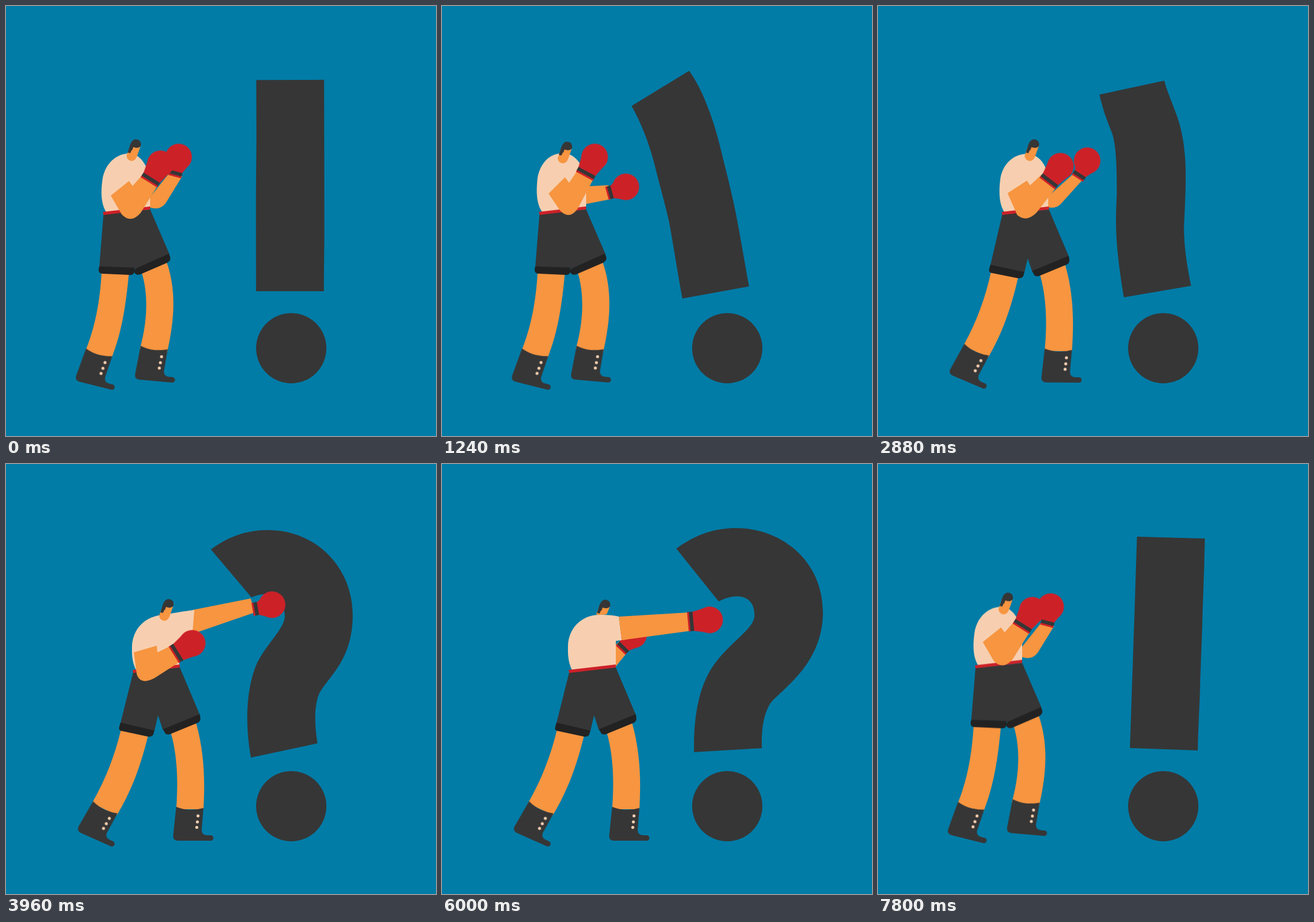
An HTML page without scripts that plays this animation: 710 by 710 pixels, repeating every 7840 ms.

```html
<!DOCTYPE html>
<html lang="en">
<head>
<meta charset="utf-8">
<title>Boxer and punctuation</title>
<style>
html, body { margin: 0; width: 100%; height: 100%; overflow: hidden; background: #007ca7; }
svg { display: block; width: 100%; height: 100%; }

.ink { fill: #363636; }
.skin { fill: #f79540; }
.cream { fill: #f7cfb0; }
.red { fill: #cd2128; }
.hem { fill: #222; }

.stance, .fight, .hop, #mark { animation: 7840ms linear infinite; }
.stance { animation-name: stance; }
.fight { animation-name: fight; }
.hop { animation-name: hop; }
#mark { animation-name: mark; animation-timing-function: ease-in-out; }

/* feet and hips: a = at rest, f = stepped in, n = feet together */
@keyframes stance {
  0%, 1.28%, 11.48%, 33.42%, 65.05%, 72.45%, 88.01%, 100% { d: var(--a); transform: var(--ta, none); }
  4.08%, 8.16%, 37.11%, 55.61%, 75.51%, 80.87% { d: var(--f); transform: var(--tf, none); }
  59.95%, 62.76%, 84.69% { d: var(--n, var(--a)); transform: var(--tn, var(--ta, none)); }
}

/* upper body: a = rest, s = sway, n = tucked, g = guard, p = far punch, q = near punch */
@keyframes fight {
  0%, 1.53%, 11.48%, 13.78%, 17.86%, 22.96%, 30.61%, 33.42%, 65.05%, 72.45%, 88.01%, 100% { d: var(--a); transform: var(--ta, none); }
  15.82%, 26.79% { d: var(--s, var(--a)); transform: var(--ts, var(--ta, none)); }
  59.95%, 62.76%, 84.69% { d: var(--n, var(--a)); transform: var(--tn, var(--ta, none)); }
  3.57%, 7.91%, 8.93%, 36.73%, 41.33%, 49.23%, 54.08%, 55.61%, 75%, 79.59%, 80.87% { d: var(--g, var(--a)); transform: var(--tg, none); }
  37.76%, 39.29%, 50.26%, 52.04% { d: var(--p, var(--a)); transform: var(--tp, none); }
  4.59%, 6.12%, 76.02%, 77.55% { d: var(--q, var(--a)); transform: var(--tq, none); }
}

@keyframes hop {
  0%, 11.73%, 15.82%, 19.9%, 23.98%, 28.06%, 32.14%, 62.76%, 66.84%, 70.92%, 87.76%, 91.84%, 95.92%, 100% {
    transform: translateY(0); animation-timing-function: ease-out;
  }
  14.29%, 18.37%, 22.45%, 26.53%, 30.61%, 65.31%, 69.39%, 90.31%, 94.39%, 98.47% {
    transform: translateY(var(--h)); animation-timing-function: ease-in;
  }
}

@keyframes mark {
  0%, 10.2%, 33.16%, 43.37%, 56.12%, 81.63%, 100% { d: var(--up); animation-timing-function: ease-out; }
  2.04%, 29.85%, 46.43%, 60.2%, 62.76%, 73.47%, 86.73%, 88.01% { d: var(--left); }
  14.8%, 15.82%, 48.21% { d: var(--far-left); }
  3.57%, 36.73%, 49.49%, 75% { d: var(--wave); animation-timing-function: linear; }
  4.59%, 37.76%, 50.51%, 76.02% { d: var(--hit); animation-timing-function: linear; }
  5.1%, 38.27%, 51.02%, 76.53% { d: var(--hook); animation-timing-function: ease-out; }
  6.12%, 7.91%, 39.29%, 41.33%, 52.04%, 53.83%, 77.55%, 79.34% { d: var(--recoil); animation-timing-function: ease-in; }
  22.96% { d: var(--far-right); }
  68.88%, 96.43% { d: var(--right); animation-timing-function: ease-in; }
  99.49% { d: var(--tilt); animation-timing-function: linear; }
}

#mark {
  --up: path("M414 122C414 151 414 181 414 210C414 250 413 290 413 330C413 377 413 424 413 471L525 471C525 430 526 400 526 365C526 330 526 290 526 250C526 220 526 190 526 165C526 150 526 136 526 122Z");
  --tilt: path("M428 120C427 149 426 178 425 208C424 248 422 288 421 328C419 375 418 422 416 469L528 473C529 432 531 402 532 367C533 332 535 292 536 252C537 222 538 192 539 167C539 152 540 138 540 123Z");
  --right: path("M457 118C454 147 451 176 449 206C445 246 441 286 437 326C432 372 428 419 423 466L535 477C539 436 542 406 545 371C549 336 553 297 556 257C559 227 562 197 564 171C565 157 567 142 568 128Z");
  --far-right: path("M478 120C472 150 467 180 463 208C457 246 450 290 444 328C438 372 432 419 426 465L538 480C543 440 549 405 554 371C560 336 566 297 572 258C577 228 583 197 587 172C589 160 592 148 594 137Z");
  --left: path("M341 150C352 176 360 203 366 233C372 268 379 305 384 338C390 385 396 430 402 479L513 465C507 420 502 380 496 335C491 305 486 280 482 252C476 215 470 190 463 165C457 143 451 123 445 107Z");
  --far-left: path("M313 165C330 195 343 230 351 262C360 298 369 330 374 352C381 387 388 435 397 483L507 463C499 420 492 375 482 327C476 300 470 275 464 252C456 218 449 192 438 165C430 143 419 122 408 107Z");
  --wave: path("M365 145C371 175 380 196 384 206C391 222 394 255 394 310C392 360 391 390 406 481L517 462C509 425 505 390 505 365C506 340 507 310 507 280C507 235 501 200 491 173C485 155 479 140 475 123Z");
  --hit: path("M404 220C440 205 459 225 459 252C457 275 425 300 411 335C396 375 394 430 404 485L514 461C509 432 508 400 516 380C530 352 571 325 571 250C571 170 510 109 431 109C395 109 364 121 337 141Z");
  --hook: path("M456 227C485 212 515 216 515 250C515 275 466 298 440 345C420 382 415 430 416 476L528 469C527 440 530 416 540 398C553 376 628 335 628 245C628 160 560 106 484 106C445 106 413 120 386 140Z");
  --recoil: path("M495 225C525 205 556 208 558 245C557 270 498 298 465 345C440 382 431 430 424 467L536 477C536 448 545 420 560 398C585 366 671 335 671 240C671 155 605 95 528 95C490 95 455 107 425 128Z");
  d: var(--up);
}

#back-leg {
  --a: path("M158 438C155 490 147 530 131 570L174 582C191 540 198 495 203 440Z");
  --f: path("M190 438C180 480 165 520 142 560L183 580C207 540 222 500 235 447Z");
  --n: path("M161 440C160 490 153 530 140 570L184 580C198 540 205 490 206 440Z");
}
#front-leg {
  --a: path("M224 440C235 475 234 520 221 566L266 572C278 520 282 470 265 422Z");
  --f: path("M272 443C284 485 284 530 281 570L326 570C329 520 327 475 314 428Z");
  --n: path("M218 440C224 480 220 520 202 560L246 570C266 515 270 470 261 426Z");
}
#back-boot {
  --ta: translate(154px, 573px) rotate(14deg);
  --tf: translate(164px, 568px) rotate(24deg);
  --tn: translate(162px, 573px) rotate(12deg);
}
#front-boot {
  --ta: translate(245px, 565px) rotate(5deg);
  --tf: translate(304px, 568px) rotate(0deg);
  --tn: translate(224px, 562px) rotate(11deg);
}
#shorts {
  --a: path("M161 344L238 336L270 410L214 435L212 433L211 433L154 431Z");
  --f: path("M210 344L287 336L320 414L259 439L251 415L245 441L189 428Z");
  --n: path("M161 343L238 335L265 412L215 433L212 432L210 432L156 431Z");
}
#back-hem {
  --a: path("M154 430L212 432L212 438Q211 445 204 444L159 442Q152 441 153 434Z");
  --f: path("M189 427L245 440L243 447Q240 451 234 450L192 441Q185 440 187 434Z");
  --n: path("M156 430L214 430L217 437Q219 443 211 443L162 443Q155 443 156 436Z");
}
#front-hem {
  --a: path("M213 434L269 409L271 414Q273 420 266 424L222 443Q214 446 211 438Z");
  --f: path("M259 438L320 413L321 420Q321 426 315 428L271 446Q264 448 262 443Z");
  --n: path("M212 432L264 411L266 416Q267 422 261 426L220 442Q213 445 210 438Z");
}
#belt { --ta: translate(0px, 0px); --tf: translate(49px, 0px); }

#torso {
  --a: path("M166 341C155 325 157 300 160 282C166 257 184 243 207 243C222 247 233 262 238 285L238 295L238 300L238 333Z");
  --s: path("M166 341C154 325 156 300 158 282C164 256 180 242 203 243C220 246 232 260 237 285L237 295L238 300L238 333Z");
  --g: path("M209 341C198 325 200 300 202 284C207 258 226 243 249 244C265 247 277 260 280 282L281 295L281 300L281 333Z");
  --p: path("M215 341C207 325 208 310 208 302C209 272 230 250 262 249C275 246 295 243 311 241L308 277L286 290L286 333Z");
  --q: path("M215 341C207 325 208 310 208 300C209 270 232 248 262 249C275 249 285 250 292 252L297 291L287 292L287 333Z");
}
#head {
  --ta: translate(0px, 0px);
  --ts: translate(-8px, 4px);
  --tg: translate(43px, 0px);
  --tp: translate(54px, 3px);
  --tq: translate(55px, 4px);
}
/* only the neck length changes here; the head group does the moving */
#face {
  --ta: none; --ts: none; --tg: none; --tp: none; --tq: none;
  --a: path("M206 228L222 232L216 249Q213 256 207 256Q199 254 199 247Z");
  --q: path("M206 228L222 232L217 244Q213 245 207 245Q200 246 200 243Z");
}
#far-arm {
  --a: path("M236 318L271 274L291 281L264 325Q254 339 236 332Z");
  --s: path("M236 298L275 296L280 319L238 327Q237 327 236 326Z");
  --n: path("M236 305L274 268L288 270L268 318Q258 333 236 325Z");
  --g: path("M278 318L319 280L339 285L303 326Q294 337 278 333Z");
  --p: path("M308 241L404 222L411 245L318 277Q312 279 306 277Z");
  --q: path("M285 300L292 294L306 311L288 333Q287 334 285 333Z");
}
#far-glove {
  --ta: translate(280px, 276px) rotate(-75deg);
  --ts: translate(278px, 308px) rotate(-15deg);
  --tn: translate(280px, 267px) rotate(-81deg);
  --tg: translate(331px, 280px) rotate(-58deg);
  --tp: translate(413px, 239px) rotate(-10deg);
  --tq: translate(299px, 303px) rotate(-46deg);
}
#near-arm {
  --a: path("M173 313L203 289L209 297L227 277L252 294L222 342Q206 360 191 344Z");
  --s: path("M176 310L203 283L210 292L226 268L251 284L224 335Q210 354 195 338Z");
  --n: path("M164 300L200 284L203 293L224 279L246 302L205 340Q187 353 176 338Z");
  --g: path("M214 309L246 288L251 296L270 278L296 297L262 341Q245 358 230 345Z");
  --p: path("M211 311L249 300L250 311L273 300L291 324L246 353Q223 366 216 348Z");
  --q: path("M297 290L294 270L292 252L409 245L414 275L310 289Q303 290 299 291Z");
}
#near-glove {
  --ta: translate(239px, 286px) rotate(-58deg);
  --ts: translate(238px, 276px) rotate(-62deg);
  --tn: translate(235px, 290px) rotate(-42deg);
  --tg: translate(283px, 288px) rotate(-53deg);
  --tp: translate(282px, 312px) rotate(-32deg);
  --tq: translate(412px, 260px) rotate(-5deg);
}
</style>
</head>
<body>
<svg viewBox="0 0 710 710">
  <defs>
    <g id="boot">
      <path class="ink" d="M-23-2Q-2 7 22 0L19 37Q20 45 28 45H34a4.5 4.5 0 0 1 0 9H-20Q-28 54-28 46Z"/>
      <g class="cream">
        <circle cx="13" cy="13" r="2.5"/>
        <circle cx="12" cy="23" r="2.5"/>
        <circle cx="11" cy="32" r="2.5"/>
      </g>
    </g>
  </defs>
  <rect width="710" height="710" fill="#007ca7"/>
  <circle class="ink" cx="471" cy="565" r="58"/>
  <path id="mark" class="ink"/>

  <g class="hop" style="--h:-16px">
    <g class="hop" style="--h:-13px">
      <path id="far-arm" class="skin fight"/>
      <g id="far-glove" class="fight">
        <path class="red" d="M-6-11H4L22-22V19L4 11H-6Z"/>
        <circle class="red" cx="27" cy="-2" r="22"/>
        <path class="ink" d="M-3-11H3V11H-3Z"/>
      </g>
    </g>

    <path id="back-leg" class="skin stance"/>
    <path id="front-leg" class="skin stance"/>
    <g id="back-boot" class="stance"><use href="#boot"/></g>
    <g id="front-boot" class="stance"><use href="#boot"/></g>
    <path id="shorts" class="ink stance"/>
    <path id="back-hem" class="hem stance"/>
    <path id="front-hem" class="hem stance"/>

    <path id="torso" class="cream fight"/>
    <g id="belt" class="stance"><path class="red" d="M160 340L238 331V336L161 345Z"/></g>
    <g id="head" class="fight">
      <path id="face" class="skin fight"/>
      <path class="ink" d="M205 229Q208 220 215 220Q223 221 223 229Q222 235 214 234L210 233L205 243L201 242Z"/>
      <path d="M209.5 233L208 238" stroke="#363636"/>
    </g>

    <g class="hop" style="--h:-24px">
      <path id="near-arm" class="skin fight"/>
      <g id="near-glove" class="fight">
        <path class="red" d="M-6-16H4L26-21V21L4 16H-6Z"/>
        <circle class="red" cx="30" r="22"/>
        <path class="ink" d="M-3-16H3V16H-3Z"/>
      </g>
    </g>
  </g>
</svg>
</body>
</html>
```
